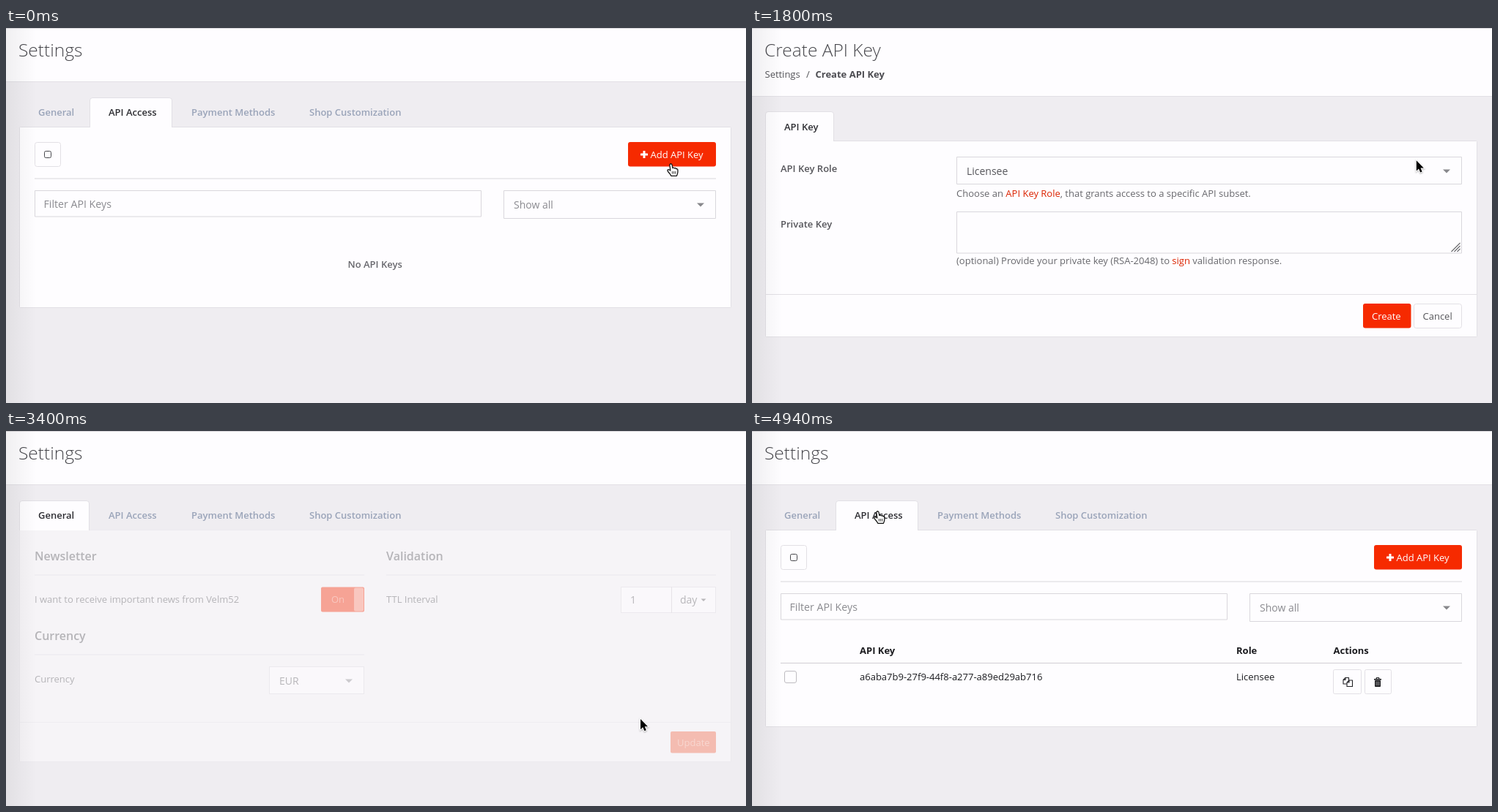
Recreate the animation shown at these times as an HTML page with a canvas. Size 1010 by 513 pixels, loop 6010 ms.

```html
<!DOCTYPE html>
<html lang="en">
<head>
<meta charset="utf-8">
<title>Create API key</title>
<style>
  html, body { margin: 0; width: 100%; height: 100%; overflow: hidden; background: #efedf1; }
  canvas { display: block; }
</style>
</head>
<body>
<canvas id="stage" width="1010" height="513"></canvas>
<script>
const ctx = document.getElementById('stage').getContext('2d');
const LOOP = 6010, TICK = 1000 / 15;
const RED = '#f62a00', RED_HOVER = '#e12700', LINK = '#dc2300', MUTED_RED = '#ef6848';
const PAPER = '#fefdff', EDGE = '#e2e0e5', FIELD = '#d9d7dc', BACK = '#efedf1';
const INK = '#55555a', DARK = '#2e2e33', SOFT = '#8b8b90', TAB = '#9aa4b9';

// Scene changes, in ms
const CREATE_AT = 990, LOADING_AT = 2875, GENERAL_AT = 3130, LIST_AT = 4590;
const PRESSES = [[730, 908.5, 174.5], [2460, 866, 394], [4395, 172, 111]];
const PATH = [
  [0, 908, 186], [267, 909, 174], [1733, 908, 175], [2400, 866, 394],
  [3733, 866, 394], [4133, 63, 118], [4267, 175, 111], [4400, 172, 110]
];

const clamp = v => Math.max(0, Math.min(1, v));
const ramp = (t, from, to) => clamp((t - from) / (to - from));
const smooth = p => p * p * (3 - 2 * p);

// Cubic bezier timing curve with a small overshoot
function backOut(p) {
  const curve = (s, a, b) => 3 * (1 - s) ** 2 * s * a + 3 * (1 - s) * s * s * b + s ** 3;
  let lo = 0, hi = 1;
  for (let i = 0; i < 24; i++) {
    const mid = (lo + hi) / 2;
    if (curve(mid, 0.175, 0.32) < p) lo = mid; else hi = mid;
  }
  return curve(lo, 0.885, 1.275);
}

function text(str, x, y, { size = 13, weight = 400, color = INK } = {}) {
  ctx.font = `${weight} ${size}px "Open Sans", sans-serif`;
  ctx.fillStyle = color;
  ctx.fillText(str, x, y);
  return x + ctx.measureText(str).width;
}

function runs(x, y, parts) {
  parts.forEach((part, i) => { x = text(part, x, y, { color: i % 2 ? LINK : '#68686d' }); });
}

function fill(x, y, w, h, color, r = 0) {
  ctx.fillStyle = color;
  ctx.beginPath();
  ctx.roundRect(x, y, w, h, r);
  ctx.fill();
}

function box(x, y, w, h, { r = 0, edge = FIELD, color = PAPER } = {}) {
  ctx.beginPath();
  ctx.roundRect(x + 0.5, y + 0.5, w - 1, h - 1, r);
  ctx.fillStyle = color;
  ctx.fill();
  ctx.strokeStyle = edge;
  ctx.lineWidth = 1;
  ctx.stroke();
}

function line(points, color, width = 1) {
  ctx.beginPath();
  points.forEach(([x, y]) => ctx.lineTo(x, y));
  ctx.strokeStyle = color;
  ctx.lineWidth = width;
  ctx.stroke();
}

const rule = (x1, x2, y, color = FIELD) => fill(x1, y, x2 - x1, 1, color);

function caret(x, y, half, color = '#88888c') {
  ctx.fillStyle = color;
  ctx.beginPath();
  ctx.moveTo(x - half, y);
  ctx.lineTo(x + half, y);
  ctx.lineTo(x, y + half);
  ctx.fill();
}

function select(x, y, w, h, label, color) {
  box(x, y, w, h);
  text(label, x + 14, y + 24.5, { size: 14, color });
  caret(x + w - 21, y + 17.5, 5);
}

function header(title, bottom) {
  fill(0, 0, 1010, 513, BACK);
  fill(0, 0, 1010, bottom, PAPER);
  rule(0, 1010, 0, '#d9d7db');
  rule(0, 1010, bottom, EDGE);
  text(title, 17, 38.5, { size: 24.5, weight: 300, color: '#48484d' });
}

function panel(top, bottom, alpha, content) {
  ctx.globalAlpha = alpha;
  box(18, top, 972, bottom - top, { edge: EDGE, r: 1 });
  content();
  ctx.globalAlpha = 1;
}

function activeTab(x, y, w, bottom) {
  ctx.beginPath();
  ctx.moveTo(x + 0.5, bottom + 1);
  ctx.lineTo(x + 0.5, y + 4);
  ctx.arcTo(x + 0.5, y + 0.5, x + 4, y + 0.5, 3.5);
  ctx.lineTo(x + w - 4, y + 0.5);
  ctx.arcTo(x + w - 0.5, y + 0.5, x + w - 0.5, y + 4, 3.5);
  ctx.lineTo(x + w - 0.5, bottom + 1);
  ctx.fillStyle = PAPER;
  ctx.fill();
  ctx.strokeStyle = EDGE;
  ctx.lineWidth = 1;
  ctx.stroke();
}

function settingsTabs(active, hover) {
  if (active === 0) activeTab(18, 95, 96, 135);
  else activeTab(114, 95, 113, 135);
  const labels = [['General', 44], ['API Access', 140], ['Payment Methods', 253], ['Shop Customization', 414]];
  labels.forEach(([label, x], i) => {
    const color = i === active ? DARK : i === hover ? '#5b5c64' : TAB;
    text(label, x, 120.3, { weight: 600, color });
  });
}

function copyIcon(x, y) {
  ctx.lineJoin = 'round';
  const sheet = (dx, dy) => {
    const l = x + dx, t = y + dy;
    const shape = [[l + 3, t], [l + 7.5, t], [l + 7.5, t + 8.5], [l, t + 8.5], [l, t + 3], [l + 3, t], [l + 3, t + 3], [l, t + 3]];
    fill(l, t, 7.5, 8.5, PAPER);
    line(shape, '#222226', 1.1);
  };
  sheet(-6, -6);
  sheet(-1, -2.5);
}

function trashIcon(x, y) {
  const ink = '#1d1d20';
  fill(x - 5, y - 4.5, 10, 1.6, ink);
  line([[x - 2, y - 4.5], [x - 1.5, y - 6], [x + 1.5, y - 6], [x + 2, y - 4.5]], ink, 1.2);
  fill(x - 4, y - 2.5, 8, 9, ink, 1);
  for (const dx of [-2, 0, 2]) fill(x + dx - 0.4, y - 1, 0.8, 5.8, '#aaaaad');
}

function keyRow() {
  const bold = { weight: 700, color: '#1c1c20' };
  text('API Key', 147, 305, bold);
  text('Role', 661, 305, bold);
  text('Actions', 793.5, 305, bold);
  rule(39, 969, 317, '#d0ced3');
  box(44, 328, 17, 17, { r: 2.5, edge: '#bebcc1' });
  text('a6aba7b9-27f9-44f8-a277-a89ed29ab716', 147, 340.5, { color: '#1c1c20' });
  text('Licensee', 661, 340.5, { color: '#1c1c20' });
  box(793, 326, 39, 34, { r: 2, edge: EDGE });
  box(836, 326, 37, 34, { r: 2, edge: EDGE });
  copyIcon(813, 343.5);
  trashIcon(854, 343.5);
}

function listPage(filled, alpha, hot) {
  header('Settings', 73);
  panel(135, filled ? 405 : 383, alpha, () => {
    box(39, 156, 36, 34, { r: 3, edge: EDGE });
    box(52, 168, 10, 10, { r: 2, edge: '#45454a' });
    fill(849, 156, 120, 33.5, RED, 3);
    if (hot > 0) {
      ctx.globalAlpha = alpha * hot;
      fill(849, 156, 120, 33.5, RED_HOVER, 3);
      ctx.globalAlpha = alpha;
    }
    fill(866, 171.5, 10, 3, '#fff', 0.5);
    fill(869.5, 168, 3, 10, '#fff', 0.5);
    text('Add API Key', 879.5, 178, { color: '#fff' });
    rule(39, 969, 205.5);
    box(39, 222, 610, 36.5);
    text('Filter API Keys', 51.5, 246, { size: 14.2, color: SOFT });
    select(679, 222, 290, 39, 'Show all', SOFT);
    if (filled) keyRow();
    else text('No API Keys', 466.5, 327.5, { weight: 600, color: '#68686d' });
  });
  settingsTabs(1, -1);
}

function spinner(x, y, t) {
  const turn = Math.floor(t / 80);
  ctx.lineCap = 'round';
  for (let i = 0; i < 12; i++) {
    const a = i * Math.PI / 6;
    const c = Math.cos(a), s = Math.sin(a);
    const shade = 0.3 + 0.6 * (((i - turn) % 12 + 12) % 12) / 11;
    line([[x + 6 * c, y + 6 * s], [x + 10 * c, y + 10 * s]], `rgba(255,255,255,${shade})`, 1.7);
  }
  ctx.lineCap = 'butt';
}

function createPage(t, hot) {
  header('Create API Key', 93);
  text('Settings', 17.5, 68);
  text('/', 74, 68);
  text('Create API Key', 86.5, 68, { weight: 700, color: '#4c4c51' });
  panel(154, 423, ramp(t, 930, 1200), () => {
    text('API Key Role', 39, 197.3, { weight: 600 });
    select(279, 176, 690, 38, 'Licensee', INK);
    runs(279, 230.5, ['Choose an ', 'API Key Role', ', that grants access to a specific API subset.']);
    text('Private Key', 39, 273, { weight: 600 });
    box(279, 251, 690, 57.5);
    for (const d of [4, 8, 12]) line([[966.5 - d, 306], [966.5, 306 - d]], '#68686c', 1.1);
    runs(279, 323, ['(optional) Provide your private key (RSA-2048) to ', 'sign', ' validation response.']);
    rule(19, 989, 364, EDGE);
    const busy = t >= LOADING_AT;
    const left = 834 - 44 * backOut(ramp(t, LOADING_AT - 8, LOADING_AT + 292));
    fill(left, 377, 899.5 - left, 33.5, busy ? '#ec6342' : hot ? RED_HOVER : RED, 3);
    if (busy) spinner(left + 27, 393.5, t);
    text('Create', 846, 398.5, { color: busy ? '#fbe5df' : '#fff' });
    box(903, 377, 66, 34, { r: 3, edge: EDGE });
    text('Cancel', 915.5, 398.5);
  });
  activeTab(18, 114, 94, 154);
  text('API Key', 44, 140, { weight: 600, color: DARK });
}

function heading(label, x, y) {
  text(label, x, y, { size: 16, weight: 600 });
  rule(x, x + 450, y + 19.5);
}

function generalPage(alpha, hover) {
  header('Settings', 73);
  panel(135, 453, alpha, () => {
    heading('Newsletter', 39, 177);
    text('I want to receive important news from Velm52', 39, 235);
    fill(430, 213.5, 59, 34, RED, 2);
    text('On', 444, 235, { color: '#fff' });
    fill(475, 214.5, 13, 32, PAPER, 2);
    heading('Currency', 39, 286);
    text('Currency', 39, 344);
    select(359, 322, 130, 38, 'EUR', INK);
    heading('Validation', 519, 177);
    text('TTL Interval', 519, 235);
    box(839, 213, 70, 36);
    box(908, 213, 61, 36);
    text('1', 852, 236, { size: 14 });
    text('day', 920, 236, { size: 14 });
    caret(952, 229.5, 3.5, INK);
    rule(19, 989, 398, EDGE);
    fill(907, 411, 62, 29.5, MUTED_RED, 2);
    text('Update', 916, 430.5, { color: '#fff' });
  });
  settingsTabs(0, hover);
}

function arrow(x, y) {
  ctx.save();
  ctx.translate(x, y);
  ctx.lineJoin = 'miter';
  ctx.shadowColor = 'rgba(0,0,0,.3)';
  ctx.shadowBlur = 2;
  ctx.shadowOffsetY = 1;
  const shape = new Path2D('M0 0V14.2L3.2 11.2 5.4 16.2 7.8 15.2 5.7 10.3H10Z');
  ctx.strokeStyle = '#fff';
  ctx.lineWidth = 2;
  ctx.stroke(shape);
  ctx.shadowColor = 'transparent';
  ctx.fillStyle = '#000';
  ctx.fill(shape);
  ctx.restore();
}

function hand(x, y) {
  ctx.save();
  ctx.translate(x, y);
  ctx.lineJoin = 'round';
  const shape = new Path2D('M-2.2 1Q-.6-1.5 1 1L1.8 5.5Q3.4 4.4 4.4 6 6.2 5 6.8 6.8 8.8 6.2 8.9 8.4V11Q8.6 14 7.4 16.3H-.2Q-2 12.8-4.6 10.2-5.8 8-4 7.6-2.6 7.6-1.2 9Z');
  ctx.fillStyle = '#fff';
  ctx.fill(shape);
  ctx.strokeStyle = '#111';
  ctx.lineWidth = 1.3;
  ctx.stroke(shape);
  for (const dx of [1.4, 3.6, 5.8]) line([[dx, 10], [dx, 13.6]], '#222', 0.9);
  ctx.restore();
}

function pointer(t) {
  const i = PATH.findIndex(([at]) => at > t);
  if (i < 0) return PATH[PATH.length - 1].slice(1);
  const [t0, x0, y0] = PATH[i - 1], [t1, x1, y1] = PATH[i];
  const p = smooth(ramp(t, t0, t1));
  return [x0 + (x1 - x0) * p, y0 + (y1 - y0) * p];
}

function pressRing(t) {
  for (const [at, x, y] of PRESSES) {
    if (t < at || t > at + 260) continue;
    ctx.globalAlpha = 1 - ramp(t, at + 130, at + 260);
    ctx.beginPath();
    ctx.arc(x, y, 31, 0, Math.PI * 2);
    ctx.strokeStyle = '#111';
    ctx.lineWidth = 1.8;
    ctx.stroke();
    ctx.globalAlpha = 1;
  }
}

function draw(t) {
  const [x, y] = pointer(t);
  let pointing = true;
  if (t < CREATE_AT) {
    listPage(false, 1, ramp(t, 0, 200));
  } else if (t < GENERAL_AT) {
    const over = x < 900 && y > 377;
    createPage(t, over);
    pointing = over && t < LOADING_AT;
  } else if (t < LIST_AT) {
    pointing = x > 114 && x < 227 && y < 135;
    generalPage(ramp(t, 3200, 3700), pointing ? 1 : -1);
  } else {
    listPage(true, ramp(t, 4530, 4800), 0);
  }
  const shade = ctx.createLinearGradient(0, 0, 42, 0);
  shade.addColorStop(0, 'rgba(0,0,0,.055)');
  shade.addColorStop(1, 'rgba(0,0,0,0)');
  ctx.fillStyle = shade;
  ctx.fillRect(0, 0, 42, 513);
  pressRing(t);
  (pointing ? hand : arrow)(x, y);
}

function frame() {
  const t = performance.now() % LOOP;
  draw(Math.floor(t / TICK) * TICK);
  requestAnimationFrame(frame);
}
frame();
</script>
</body>
</html>
```
